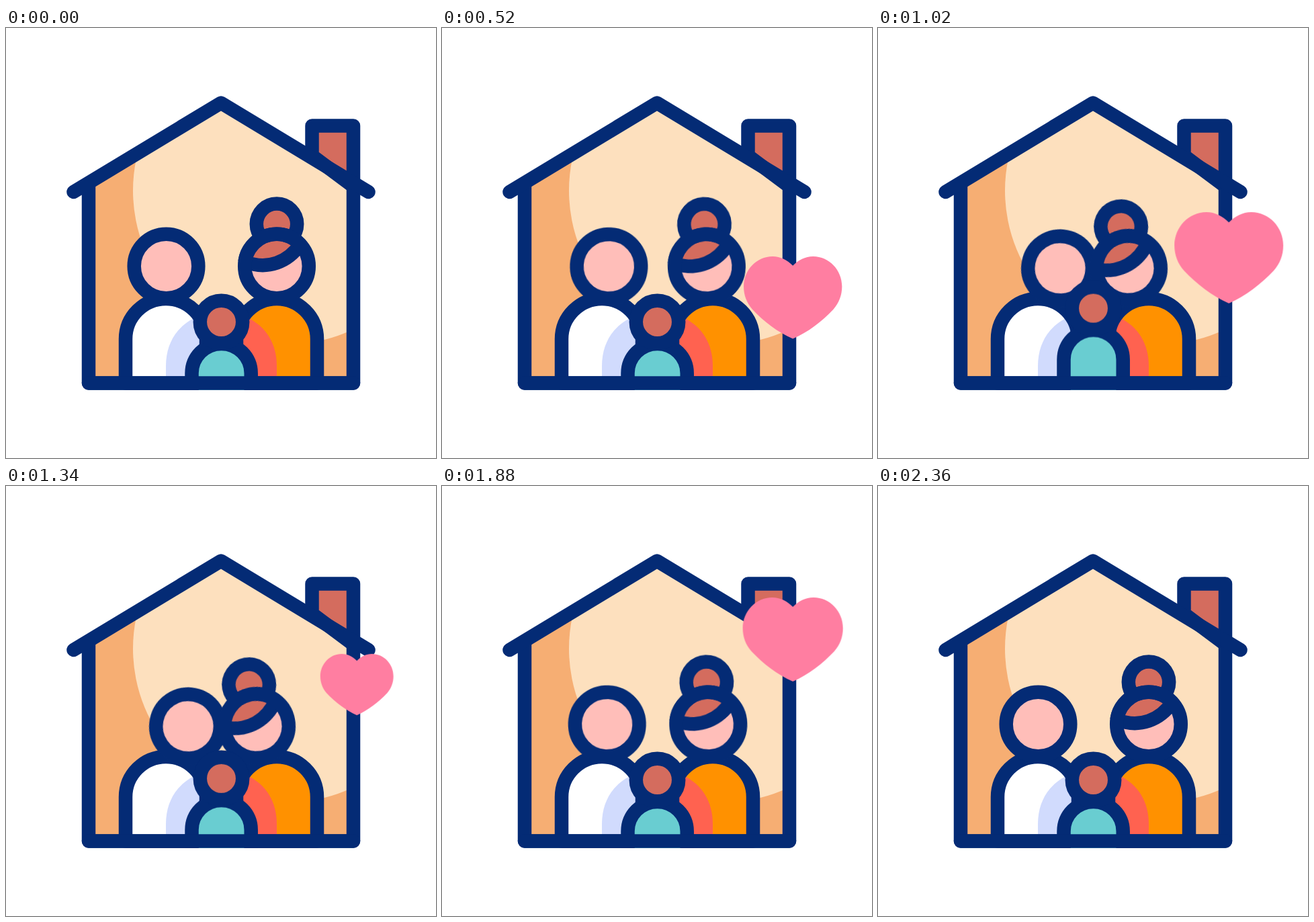
An HTML page without scripts for the animation above (2400 ms loop, 640x640 px).

```html
<!DOCTYPE html>
<html lang="en">
<head>
<meta charset="utf-8">
<title>Family at home</title>
<style>
  html, body { margin: 0; width: 100%; height: 100%; overflow: hidden; background: #fff; }
  svg { display: block; width: 100vw; height: 100vh; }

  .line { stroke: #042b75; stroke-width: 20.5; stroke-linecap: round; stroke-linejoin: round; }
  .butt { stroke-linecap: butt; }
  .none { fill: none; }
  .wall { fill: #fde0be; }
  .wall-shade { fill: #f6ae73; }
  .brown { fill: #d46c5e; }
  .skin { fill: #ffbeb9; }
  .white { fill: #fff; }
  .blue { fill: #d1dbfd; }
  .orange { fill: #ff9100; }
  .red { fill: #ff6250; }
  .teal { fill: #69cdd1; }
  .pink { fill: #ff7ea1; }

  .lean, .hop, .rise, .beat { animation: 2400ms infinite cubic-bezier(.333, 0, .667, 1); }
  .lean { animation-name: lean; animation-timing-function: cubic-bezier(.75, 0, .25, 1); }
  .hop { animation-name: hop; }
  .rise { animation-name: rise; }
  .beat { animation-name: beat; }
  .father { --tilt: 11.4deg; transform-origin: 238.5px 521.5px; }
  .mother { --tilt: -10.5deg; transform-origin: 403px 521.5px; }

  @keyframes lean {
    0%, 98.333%, 100% { transform: rotate(0deg); }
    49.167% { transform: rotate(var(--tilt)); }
  }
  @keyframes hop {
    0%, 22.5%, 59.375%, 100% { transform: translateY(0); }
    41.875% { transform: translateY(-20.5px); }
  }
  @keyframes rise {
    0%, 5.833% { transform: translate(522.2px, 418.6px); }
    95.833%, 100% { transform: translate(522.2px, 207.6px); }
  }
  @keyframes beat {
    0%, 6.875% { transform: scale(0); }
    23.333% { transform: scale(.94); }
    33.333% { transform: scale(.625); }
    45%, 68.333% { transform: scale(1.0625); }
    56.667% { transform: scale(.675); }
    80% { transform: scale(.925); }
    95.833%, 100% { transform: scale(0); }
  }
</style>
</head>
<body>
<svg viewBox="0 0 640 640">
  <defs>
    <path id="room" d="M123 236 320 112 517 236V528.5H123Z"/>
    <path id="torso" d="M178 528.5V463a60 60 0 0 1 120 0V528.5Z"/>
    <path id="fold" d="M238 528.5V503C238 470 254 444 282 431L298 463V528.5Z"/>
    <clipPath id="in-room"><use href="#room"/></clipPath>
    <clipPath id="above-floor"><path d="M0 0H640V539H0Z"/></clipPath>
  </defs>

  <!-- house -->
  <use href="#room" class="wall-shade"/>
  <circle class="wall" cx="418" cy="242" r="229" clip-path="url(#in-room)"/>
  <path class="line brown" d="M455.5 190V145.5H517V236Z"/>
  <path class="line butt none" d="M123 236V528.5H517V236"/>
  <path class="line none" d="M100.5 244 320 111.5 539.5 244"/>

  <!-- father -->
  <use href="#torso" class="white"/>
  <use href="#fold" class="blue"/>
  <use href="#torso" class="line none"/>

  <!-- mother -->
  <g transform="translate(641 0) scale(-1 1)">
    <use href="#torso" class="orange"/>
    <use href="#fold" class="red"/>
    <use href="#torso" class="line none"/>
  </g>

  <circle class="lean father line skin" cx="238.5" cy="354.5" r="47.8"/>
  <g class="lean mother">
    <circle class="line brown" cx="403" cy="291.8" r="30.2"/>
    <circle class="skin" cx="403" cy="354.5" r="47.8"/>
    <path class="line butt brown" d="M355.5 348C390 361 420 348 438 322A47.8 47.8 0 0 0 355.5 348"/>
    <circle class="line none" cx="403" cy="354.5" r="47.8"/>
  </g>

  <!-- child -->
  <g clip-path="url(#above-floor)">
    <g class="hop">
      <path class="line teal" d="M276.5 580V514a44.1 44.1 0 0 1 88.2 0V580Z"/>
      <circle class="line brown" cx="320.5" cy="437.5" r="31.7"/>
    </g>
  </g>
  <path class="line none" d="M123 528.5H517"/>

  <g class="rise">
    <path class="beat pink" d="M0-52C-9-61-20-67-33-67-59-67-80-45-80-18-80-4-75 9-66 19-47 39-25 56 0 67 25 56 47 39 66 19 75 9 80-4 80-18 80-45 59-67 33-67 20-67 9-61 0-52Z"/>
  </g>
</svg>
</body>
</html>
```
